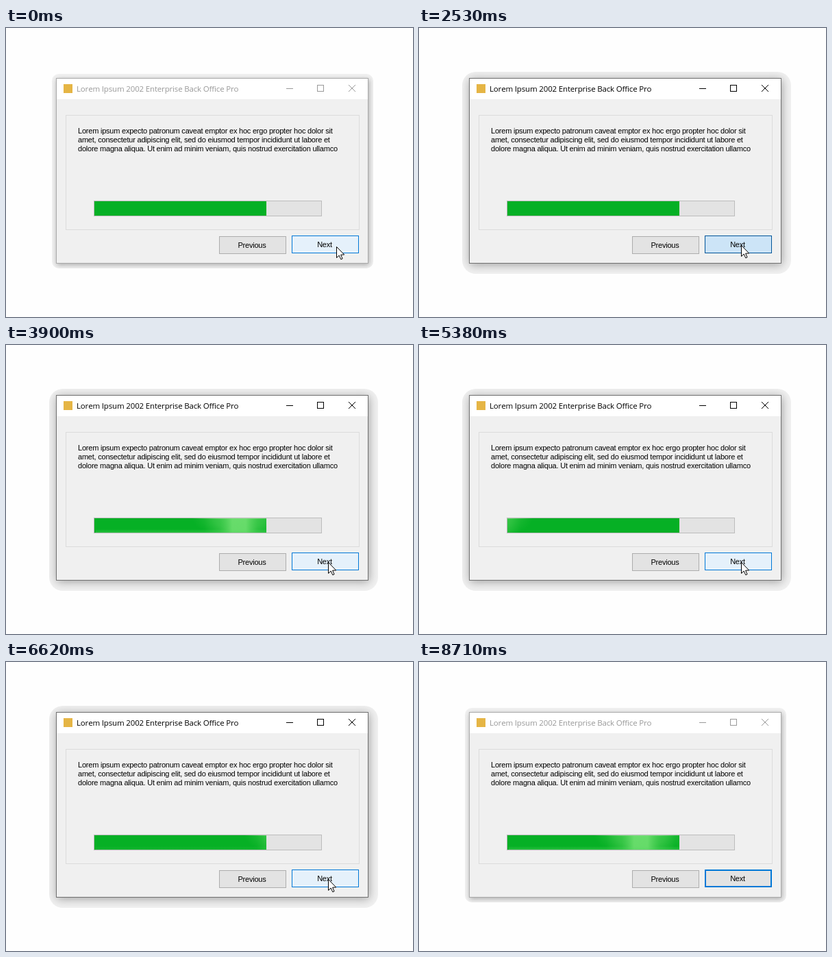
Animation, 594 px wide and 422 px high, one loop 8.81 s. Source, as an HTML page with a canvas:

```html
<!DOCTYPE html>
<html lang="en">
<head>
<meta charset="utf-8">
<title>Installer dialog</title>
<style>
html, body { margin: 0; width: 100%; height: 100%; overflow: hidden; background: #fefefe; }
canvas { display: block; }
</style>
</head>
<body>
<canvas id="stage" width="594" height="422"></canvas>
<script>
const ctx = document.getElementById('stage').getContext('2d');
const LOOP = 8810;
const UI = '11px "Liberation Sans", Arial, sans-serif';
const CAPTION = '11.5px "Open Sans", "Noto Sans", sans-serif';
const BODY = [
  'Lorem ipsum expecto patronum caveat emptor ex hoc ergo propter hoc dolor sit',
  'amet, consectetur adipiscing elit, sed do eiusmod tempor incididunt ut labore et',
  'dolore magna aliqua. Ut enim ad minim veniam, quis nostrud exercitation ullamco'
];

// [start, value]: each value holds until the next start
const active = [[0, false], [1460, true], [8470, false]];
const button = [
  [0, 'hover'], [2530, 'pressed'], [2690, 'hover'], [4185, 'pressed'], [4320, 'hover'],
  [5655, 'pressed'], [5795, 'hover'], [6740, 'pressed'], [7020, 'hover'], [7300, 'focus']
];
const pointer = [
  [0, [482, 319]], [1860, [478, 318]], [1995, [473, 318]], [2130, [470, 317]],
  [7020, [473, 316]], [7300, [492, 336]], [7430, [524, 366]],
  [7565, [552, 394]], [7700, [569, 414]], [7830, null]
];
// start and step length of each sweep of light over the bar
const sweeps = [[0, null], [530, 130], [2960, 134], [5380, 137], [7830, 125]];

const STYLES = {
  normal: ['#e3e3e3', '#adadad', 1],
  hover: ['#e5f1fb', '#0078d7', 1],
  pressed: ['#cce4f7', '#005499', 1],
  focus: ['#e3e3e3', '#0078d7', 2]
};

function keyAt(keys, t) {
  let found = keys[0];
  for (const key of keys) if (t >= key[0]) found = key;
  return found;
}
const valueAt = (keys, t) => keyAt(keys, t)[1];

function box(x, y, w, h, fill, stroke, line = 1) {
  if (fill) {
    ctx.fillStyle = fill;
    ctx.fillRect(x, y, w, h);
  }
  if (stroke) {
    ctx.strokeStyle = stroke;
    ctx.lineWidth = line;
    ctx.strokeRect(x + line / 2, y + line / 2, w - line, h - line);
  }
}

function text(str, x, y, font, color, align = 'left', spacing = -0.22) {
  ctx.font = font;
  ctx.fontKerning = 'none';
  ctx.letterSpacing = spacing + 'px';
  ctx.textAlign = align;
  ctx.fillStyle = color;
  ctx.fillText(str, x, y);
}

function path(points, close) {
  ctx.beginPath();
  points.forEach(([x, y]) => ctx.lineTo(x, y));
  if (close) ctx.closePath();
}

function shade(gradient, stops) {
  stops.forEach(([at, rgba]) => gradient.addColorStop(at, `rgba(${rgba})`));
  return gradient;
}

function shadow(on) {
  ctx.save();
  ctx.beginPath();
  if (on) ctx.roundRect(63, 64, 480, 295, 20);
  else ctx.roundRect(67, 67, 469, 284, 10);
  ctx.fillStyle = '#f1f1f1';
  ctx.fill();
  ctx.clip();
  ctx.shadowColor = on ? 'rgba(0,0,0,.34)' : 'rgba(0,0,0,.3)';
  ctx.shadowBlur = on ? 13 : 7;
  ctx.shadowOffsetY = 2;
  ctx.shadowOffsetX = 1;
  ctx.fillRect(73, 73, 456, 271);
  ctx.restore();
}

function titleBar(on) {
  const ink = on ? '#000' : '#999';
  box(74, 74, 454, 30, '#fff');
  box(84, 82, 13, 13, '#e5b545');
  text('Lorem Ipsum 2002 Enterprise Back Office Pro', 103, 93, CAPTION, ink, 'left', -0.16);
  box(409, 88, 10, 1, ink);
  box(454, 83, 10, 10, null, ink);
  ctx.strokeStyle = ink;
  ctx.lineWidth = 1;
  path([[500, 83], [510, 93]]);
  ctx.stroke();
  path([[510, 83], [500, 93]]);
  ctx.stroke();
}

function sweepLight(t) {
  const [start, step] = keyAt(sweeps, t);
  if (!step) return;
  const x = 98 + 0.258 * Math.floor((t - start) / step) * step;
  const reach = 68;
  if (x - reach > 380) return;

  ctx.save();
  ctx.beginPath();
  ctx.rect(129, 253, 251, 21);
  ctx.clip();

  // halo, widest at the upper edge
  ctx.save();
  ctx.translate(x, 253);
  ctx.scale(1, 0.45);
  ctx.fillStyle = shade(ctx.createRadialGradient(0, 0, 0, 0, 0, reach),
    [[0, '100,220,105,.7'], [0.55, '80,208,88,.45'], [1, '50,195,65,0']]);
  ctx.fillRect(-reach, 0, reach * 2, reach);
  ctx.restore();

  // bright core
  ctx.fillStyle = shade(ctx.createLinearGradient(x - 50, 0, x + 50, 0), [
    [0, '60,200,72,0'], [0.22, '70,205,80,.4'], [0.4, '108,222,110,.9'],
    [0.6, '108,222,110,.9'], [0.78, '70,205,80,.4'], [1, '60,200,72,0']
  ]);
  ctx.fillRect(x - 50, 253, 100, 21);

  // highlight on the top edge
  ctx.fillStyle = shade(ctx.createLinearGradient(x - reach, 0, x + reach, 0), [
    [0, '150,232,150,0'], [0.3, '150,232,150,.55'],
    [0.7, '150,232,150,.55'], [1, '150,232,150,0']
  ]);
  ctx.fillRect(x - reach, 253, reach * 2, 1);

  // faint glow along the lower edge
  const inside = Math.max(0, Math.min(1, (x - 135) / 50, (440 - x) / 60));
  ctx.fillStyle = shade(ctx.createLinearGradient(0, 269, 0, 274),
    [[0, '90,215,100,0'], [1, `90,215,100,${0.4 * inside}`]]);
  ctx.fillRect(131, 269, 249, 5);
  ctx.restore();
}

function pushButton(label, x, y, state) {
  const [fill, stroke, line] = STYLES[state];
  box(x, y, 98, 26, fill, stroke, line);
  text(label, x + 48, y + 17, UI, '#000', 'center');
}

function arrow(x, y) {
  ctx.save();
  ctx.translate(x + 0.5, y + 0.5);
  path([[0, 0], [0, 16], [3.7, 12.6], [6.3, 18.3], [8.6, 17.3], [6.1, 11.7], [11.2, 11.5]], true);
  ctx.fillStyle = '#fff';
  ctx.fill();
  ctx.strokeStyle = '#000';
  ctx.lineWidth = 1;
  ctx.stroke();
  ctx.restore();
}

function draw(t) {
  const on = valueAt(active, t);
  box(0, 0, 594, 422, '#fefefe');
  shadow(on);
  box(73, 73, 456, 271, '#f0f0f0', on ? '#707070' : '#aaa');
  titleBar(on);

  box(87, 127, 429, 168, null, '#dcdcdc');
  BODY.forEach((line, i) => text(line, 105, 154 + 13 * i, UI, '#000'));

  box(128, 252, 333, 23, '#e3e3e3', '#bcbcbc');
  box(129, 253, 251, 21, '#06b025');
  sweepLight(t);

  pushButton('Previous', 311, 304, 'normal');
  pushButton('Next', 417, 303, valueAt(button, t));

  const tip = valueAt(pointer, t);
  if (tip) arrow(...tip);
}

const begin = performance.now();
function tick() {
  draw((performance.now() - begin) % LOOP);
  requestAnimationFrame(tick);
}
tick();
</script>
</body>
</html>
```
